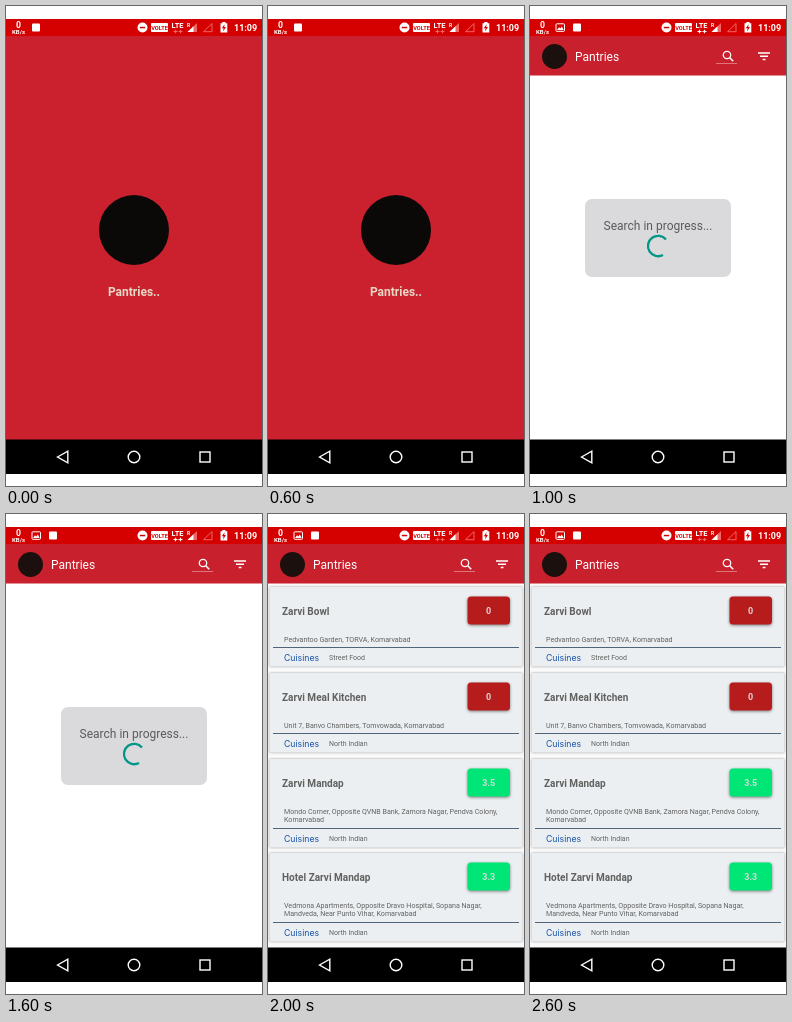
An HTML page that plays this animation: 256x480 px, repeating every 3000 ms.

```html
<!DOCTYPE html>
<html lang="en">
<head>
<meta charset="utf-8">
<style>
  html, body { margin: 0; width: 100%; height: 100%; overflow: hidden; background: #fff; }
  svg { display: block; width: 256px; height: 480px; font-family: Roboto, sans-serif; }
  .bold { font-weight: 700; }
  .mid { text-anchor: middle; }
  .cuisine { font: 8.7px Inter, sans-serif; fill: #1450a8; }
  .card { filter: drop-shadow(0 .7px 1px #0006); }
  .badge { filter: drop-shadow(0 1.5px 1.5px #0007); }
</style>
</head>
<body>
<svg viewBox="0 0 256 480">
  <g id="splash">
    <rect y="30" width="256" height="404" fill="#cb212e"/>
    <circle cx="128" cy="224" r="35" fill="#0b0908"/>
    <text class="bold mid" x="128" y="290" font-size="12" fill="#e6d8c4">Pantries..</text>
  </g>

  <g id="search">
    <rect x="55" y="193" width="146" height="78" rx="7" fill="#dadadc"/>
    <text class="mid" x="128" y="224" font-size="12" fill="#5a5a5c">Search in progress...</text>
    <path d="M136 233.5A10.2 10.2 0 1 0 133 249" fill="none" stroke="#009688" stroke-width="2.3"/>
  </g>

  <g id="results"></g>

  <g id="toolbar" fill="none" stroke="#fff">
    <rect y="30" width="256" height="39.5" fill="#c9202d" stroke="none"/>
    <circle cx="24.5" cy="50.5" r="12.5" fill="#1c100e" stroke="none"/>
    <text x="45" y="55" font-size="12" fill="#fff" stroke="none">Pantries</text>
    <circle cx="197" cy="49" r="3.7" stroke-width="1.3"/>
    <path d="M199.8 51.8L203.2 55.2" stroke-width="1.6"/>
    <path d="M186 57.5H207" stroke="#e58a90" stroke-width=".8"/>
    <path d="M228 47H240M230 50.3H238M232.7 53.5H235.5" stroke-width="1.4"/>
  </g>

  <g id="status" fill="#fff">
    <rect y="13" width="256" height="17" fill="#d50000"/>
    <g class="bold mid">
      <text x="12.5" y="22.2" font-size="8.7">0</text>
      <text x="12.5" y="28" font-size="6">KB/s</text>
      <text x="171.5" y="22" font-size="7.5">LTE</text>
      <text x="182.5" y="21" font-size="5">R</text>
    </g>
    <g id="picture">
      <rect x="26" y="17.8" width="8.5" height="7.5" rx=".8" fill="none" stroke="#fff"/>
      <path d="M27 24L29 21.3L30.3 22.6L31.8 20.5L33.7 24Z"/>
    </g>
    <rect id="notice" y="17.5" width="8" height="8" rx="1"/>
    <circle cx="136.5" cy="21.5" r="5"/>
    <rect x="133.8" y="20.8" width="5.4" height="1.5" fill="#d50000"/>
    <rect x="145" y="17" width="17" height="9" rx="1"/>
    <text class="bold mid" x="153.5" y="23.7" font-size="5.6" fill="#d50000">VOLTE</text>
    <path id="data" d="M167.5 25.5H171.5M169.5 23.8V27.2M172.5 25.5H176.5M174.5 23.8V27.2" stroke-width="1.2"/>
    <path d="M191 17V26H181.5Z" fill="#e66"/>
    <path d="M187.5 20.3V26H181.5Z"/>
    <path d="M206 17.5V25.7H197.5Z" fill="none" stroke="#e66"/>
    <path d="M214.5 17.2H216.3V16H219.5V17.2H221.3V26.5H214.5Z"/>
    <path d="M218.6 18.3L215.8 22.2H217.6L217 25.4L220 21.1H218.2Z" fill="#d50000"/>
    <text class="bold" x="228" y="25" font-size="9">11:09</text>
  </g>

  <rect y="433.5" width="256" height="34.5"/>
  <g fill="none" stroke="#fff" stroke-width="1.4">
    <path d="M51.5 451L61.8 445.2V456.8Z"/>
    <circle cx="128" cy="451" r="5.8"/>
    <rect x="194" y="446" width="10" height="10"/>
  </g>
</svg>

<script>
const $ = id => document.getElementById(id);

const places = [
  { y: 73, name: "Zarvi Bowl", score: "0", food: "Street Food",
    address: ["Pedvantoo Garden, TORVA, Komarvabad"] },
  { y: 159, name: "Zarvi Meal Kitchen", score: "0", food: "North Indian",
    address: ["Unit 7, Banvo Chambers, Tomvowada, Komarvabad"] },
  { y: 245, name: "Zarvi Mandap", score: "3.5", food: "North Indian",
    address: ["Mondo Corner, Opposite QVNB Bank, Zamora Nagar, Pendva Colony,", "Komarvabad"] },
  { y: 339, name: "Hotel Zarvi Mandap", score: "3.3", food: "North Indian",
    address: ["Vedmona Apartments, Opposite Dravo Hospital, Sopana Nagar,", "Mandveda, Near Punto Vihar, Komarvabad"] },
];

function card({ y, name, score, food, address }) {
  const extra = (address.length - 1) * 9;
  const lines = address.map((line, i) =>
    `<text x="16" y="${54.5 + i * 8.7}" font-size="7.1">${line}</text>`).join("");
  return `<g transform="translate(0 ${y})" fill="#616161">
    <rect class="card" x="1.5" width="253" height="${79.5 + extra}" rx="1" fill="#eceff1"/>
    <text class="bold" x="14" y="27.5" font-size="10">${name}</text>
    <rect class="badge" x="199.5" y="9.5" width="42.5" height="28" rx="3.5" fill="${+score ? "#00e676" : "#b71c1c"}"/>
    <text class="bold mid" x="220.7" y="27" font-size="9" fill="#d5d9d9">${score}</text>
    ${lines}
    <g transform="translate(0 ${extra})">
      <path d="M5 60.5H251" stroke="#50657a"/>
      <text class="cuisine" x="16" y="73.7">Cuisines</text>
      <text x="61" y="73.4" font-size="7">${food}</text>
    </g>
  </g>`;
}

$("results").innerHTML = `<rect y="69" width="256" height="365" fill="#fafafa"/>` + places.map(card).join("");

const scenes = ["splash", "search", "results"];

function draw() {
  const step = Math.floor(performance.now() % 3000 / 1000);
  const show = (id, on) => $(id).style.display = on ? "" : "none";
  scenes.forEach((id, i) => show(id, i === step));
  show("toolbar", step > 0);
  show("picture", step > 0);
  $("notice").setAttribute("x", step ? 43 : 26);
  $("data").setAttribute("stroke", step === 1 ? "#fff" : "#e66");
  requestAnimationFrame(draw);
}
draw();
</script>
</body>
</html>
```
